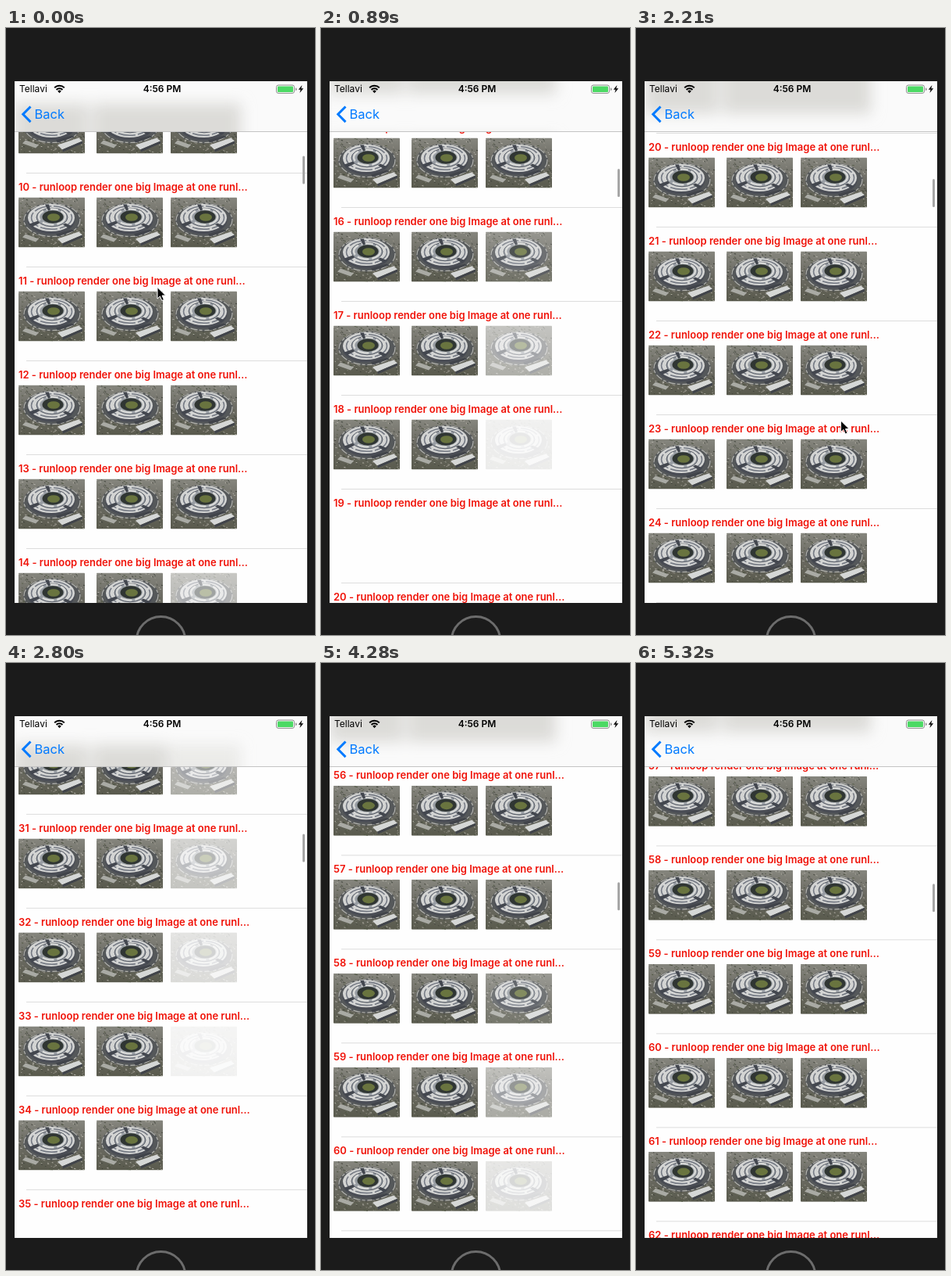
These frames come from a looping animation (396x776 px, 5.42 s). An HTML page:

```html
<!DOCTYPE html>
<html lang="en">
<head>
<meta charset="utf-8">
<title>Run loop image list</title>
<style>
  html, body { margin: 0; width: 100%; height: 100%; overflow: hidden; background: #1b1b1b; }
  svg { display: block; width: 396px; height: 776px; }
  text { font-family: Inter, "Liberation Sans", sans-serif; }
  .title { font-size: 13px; font-weight: 600; fill: #f01208; }
</style>
</head>
<body>
<svg viewBox="0 0 396 776">
  <defs>
    <clipPath id="listClip"><rect x="11" y="132" width="375" height="603"/></clipPath>
    <clipPath id="navClip"><rect x="11" y="68" width="375" height="64"/></clipPath>
    <clipPath id="photoClip"><rect width="85" height="64" rx="1"/></clipPath>
    <filter id="soft" filterUnits="userSpaceOnUse" x="-40" y="-100" width="476" height="400">
      <feGaussianBlur stdDeviation="9"/>
    </filter>
    <linearGradient id="land" x1="0" y1="0" x2="0" y2="1">
      <stop offset="0" stop-color="#86867e"/>
      <stop offset=".45" stop-color="#6d6c64"/>
      <stop offset="1" stop-color="#595a4d"/>
    </linearGradient>
    <g id="photo" clip-path="url(#photoClip)">
      <rect width="85" height="64" fill="url(#land)"/>
      <g id="town"></g>
      <ellipse cx="43" cy="29" rx="37" ry="22" fill="#55585a"/>
      <ellipse cx="43" cy="29" rx="36" ry="21" fill="none" stroke="#b3b3ad" stroke-width="1.2" stroke-dasharray="9 3 4 2"/>
      <ellipse cx="42" cy="29" rx="30.5" ry="18" fill="#4a4d55"/>
      <ellipse cx="42" cy="26" rx="30" ry="17.5" fill="#d3d4d3"/>
      <ellipse cx="42.5" cy="26" rx="26" ry="14.8" fill="none" stroke="#747983" stroke-width="1.6" stroke-dasharray="22 3"/>
      <ellipse cx="43" cy="25.5" rx="20" ry="11.8" fill="#989da3" stroke="#555a64" stroke-width="1"/>
      <ellipse cx="43" cy="25" rx="17" ry="10" fill="none" stroke="#d9dad8" stroke-width="2.4" stroke-dasharray="15 4"/>
      <ellipse cx="44" cy="25" rx="13.5" ry="8.2" fill="#303633"/>
      <ellipse cx="45" cy="25.5" rx="8" ry="4.8" fill="#69743f"/>
      <path d="M34 9l4 8 3-1-2-7zM14 34l11-4 2 3-10 5zM60 33l9 4-4 3-8-5z" fill="#43474f"/>
      <path d="M50 53l27-9 5 4-26 11z" fill="#d5d7d6"/>
      <path d="M56 59l26-11v3l-25 11zM50 50l21-7-3-2-20 6z" fill="#41444a"/>
      <path d="M9 47l17 6-4 4-17-6z" fill="#a9aaa4"/>
    </g>
  </defs>

  <rect width="396" height="776" fill="#1b1b1b"/>
  <rect x="11" y="68" width="375" height="667" fill="#fefefe"/>
  <g id="list" clip-path="url(#listClip)"></g>
  <rect id="bar" x="380" width="3" height="36" rx="1.5" fill="#a6a6a6"/>

  <g clip-path="url(#navClip)">
    <rect x="11" y="68" width="375" height="64" fill="#fafafa"/>
    <g id="haze" fill="#dcdbd8" filter="url(#soft)"></g>
  </g>
  <rect x="11" y="132" width="375" height="1" fill="#c4c4c4"/>

  <text x="17" y="82" font-size="12">Tellavi</text>
  <g fill="none" stroke="#000" stroke-width="2">
    <path d="M62.2 76.4a8.6 8.6 0 0 1 12.6 0M64.6 79a5.2 5.2 0 0 1 7.8 0"/>
  </g>
  <path d="M66.2 80.8a3.2 3.2 0 0 1 4.6 0l-2.3 2.4z"/>
  <text x="200" y="82" font-size="12" font-weight="600" text-anchor="middle">4:56 PM</text>
  <rect x="346.5" y="73" width="23" height="10.4" rx="2.5" fill="none" stroke="#8c8c8c"/>
  <rect x="348" y="74.5" width="20" height="7.4" rx="1" fill="#4cd964"/>
  <path d="M371 76.2q1.6.6 1.6 2t-1.6 2z" fill="#8c8c8c"/>
  <path d="M379.4 73l-4.6 5.7h2.8l-1.2 4.4 4.8-5.9h-2.9z"/>
  <path d="M31.5 100.5L21.8 110.3l9.7 9.8" fill="none" stroke="#007aff" stroke-width="3"/>
  <text x="36.5" y="116" font-size="16.5" fill="#007aff">Back</text>

  <circle cx="198.5" cy="784" r="31.5" fill="none" stroke="#6c6c6c" stroke-width="3"/>
  <path id="cursor" d="M0 0v14.6l3.4-3.2 2.4 5.6 2.6-1.1-2.4-5.4h4.6z" fill="#000" stroke="#fff" stroke-width="1"/>
</svg>
<script>
const LOOP = 5420, STEPS = 37, ROW = 120, POOL = 7;
const SHORT_STEPS = new Set([4, 7, 12, 14, 16, 20, 25, 32]);
const COLUMNS = [16, 116, 211];
const FADE = 300;

// [row, time its third picture starts to fade in]
const LOADS = [[13, -600], [14, -135], [15, 480], [16, 635], [18, 860], [19, 955], [23, 1300],
  [24, 1650], [25, 2450], [53, 3600], [54, 3655], [55, 3745], [61, 4320], [62, 5000]];
// [scroll offset, indicator top]
const BAR = [[1015, 163.5], [1691, 180], [2127, 190], [2266, 193], [6240, 273.5], [6685, 282], [6727, 282.3]];
const POINTER = { 0: [194, 331.5], 15: [262.5, 502], 32: [381.5, 720], 33: [376, 754] };

const $ = id => document.getElementById(id);
const clamp = v => Math.max(0, Math.min(1, v));

function add(parent, tag, attrs) {
  const el = document.createElementNS("http://www.w3.org/2000/svg", tag);
  for (const key in attrs) el.setAttribute(key, attrs[key]);
  return parent.appendChild(el);
}

function lerpTable(table, x) {
  let i = 1;
  while (i < table.length - 1 && x > table[i][0]) i++;
  const [x0, y0] = table[i - 1], [x1, y1] = table[i];
  return y0 + (y1 - y0) * clamp((x - x0) / (x1 - x0));
}

const glide = (from, reach, rate, t) => from + reach * (1 - Math.exp(-rate * t));

function hermite(a, b, va, vb, span, t) {
  const u = t / span, w = 1 - u;
  return a * w * w * (1 + 2 * u) + b * u * u * (3 - 2 * u) + span * u * w * (va * w - vb * u);
}

function scrollAt(t) {
  if (t < 890) return hermite(1015, 1691, .25, 1.29, 890, t);
  if (t < 2210) return glide(1691, 613.5, .0021, t - 890);
  if (t < 3690) return hermite(2266, 6240, .08, 1.04, 1480, t - 2210);
  return glide(6240, 504.2, .00206, t - 3690);
}

function opacities(row, t) {
  const load = lerpTable(LOADS, row);
  return [t >= load - 55 ? 1 : 0, t >= load - 20 ? 1 : 0, clamp((t - load) / FADE)];
}

function buildTown() {
  let seed = 11;
  const random = () => (seed = seed * 16807 % 2147483647) / 2147483647;
  for (const color of ["#b5b3aa", "#3f423a", "#98958b", "#4d5540"]) {
    let d = "";
    for (let i = 0; i < 75; i++) {
      const x = random() * 84, y = random() * 63, w = 1 + random() * 1.6;
      d += `M${x.toFixed(1)} ${y.toFixed(1)}l${w.toFixed(1)} .5v.9l-${w.toFixed(1)}-.5z`;
    }
    add($("town"), "path", { d, fill: color });
  }
}

function buildRow() {
  const group = add($("list"), "g", {});
  add(group, "rect", { x: 26, width: 360, height: 1, fill: "#dddddd" });
  const title = add(group, "text", { x: 16, y: 22.7, class: "title" });
  const photos = COLUMNS.map(x => add(group, "use", { href: "#photo", x, y: 31.5 }));
  const haze = add($("haze"), "g", {});
  const shades = COLUMNS.map(x => add(haze, "rect", { x: x - 5, y: 31.5, width: 95, height: 64 }));
  return { group, title, photos, haze, shades };
}

buildTown();
const rows = Array.from({ length: POOL }, buildRow);

function stepAt(time) {
  let start = 0;
  for (let step = 0; step < STEPS - 1; step++) {
    const end = start + (SHORT_STEPS.has(step) ? 140 : 150);
    if (time < end) return [step, start];
    start = end;
  }
  return [STEPS - 1, start];
}

function draw(step, t) {
  const scroll = scrollAt(t);
  const first = Math.ceil((scroll - 60) / ROW);
  rows.forEach((row, i) => {
    const index = first + i, top = index * ROW - scroll;
    const move = `translate(0 ${top.toFixed(2)})`;
    row.group.setAttribute("transform", move);
    row.haze.setAttribute("transform", move);
    row.haze.setAttribute("display", top < 140 ? "inline" : "none");
    row.title.textContent = `${index} - runloop render one big Image at one runl…`;
    opacities(index, t).forEach((alpha, c) => {
      row.photos[c].setAttribute("opacity", alpha);
      row.shades[c].setAttribute("opacity", alpha);
    });
  });
  $("bar").setAttribute("y", lerpTable(BAR, scroll));
  const point = POINTER[step];
  $("cursor").setAttribute("display", point ? "inline" : "none");
  if (point) $("cursor").setAttribute("transform", `translate(${point})`);
}

const begin = performance.now();
let shown = -1;
function tick() {
  const [step, start] = stepAt((performance.now() - begin) % LOOP);
  if (step !== shown) draw(shown = step, start);
  requestAnimationFrame(tick);
}
tick();
</script>
</body>
</html>
```
